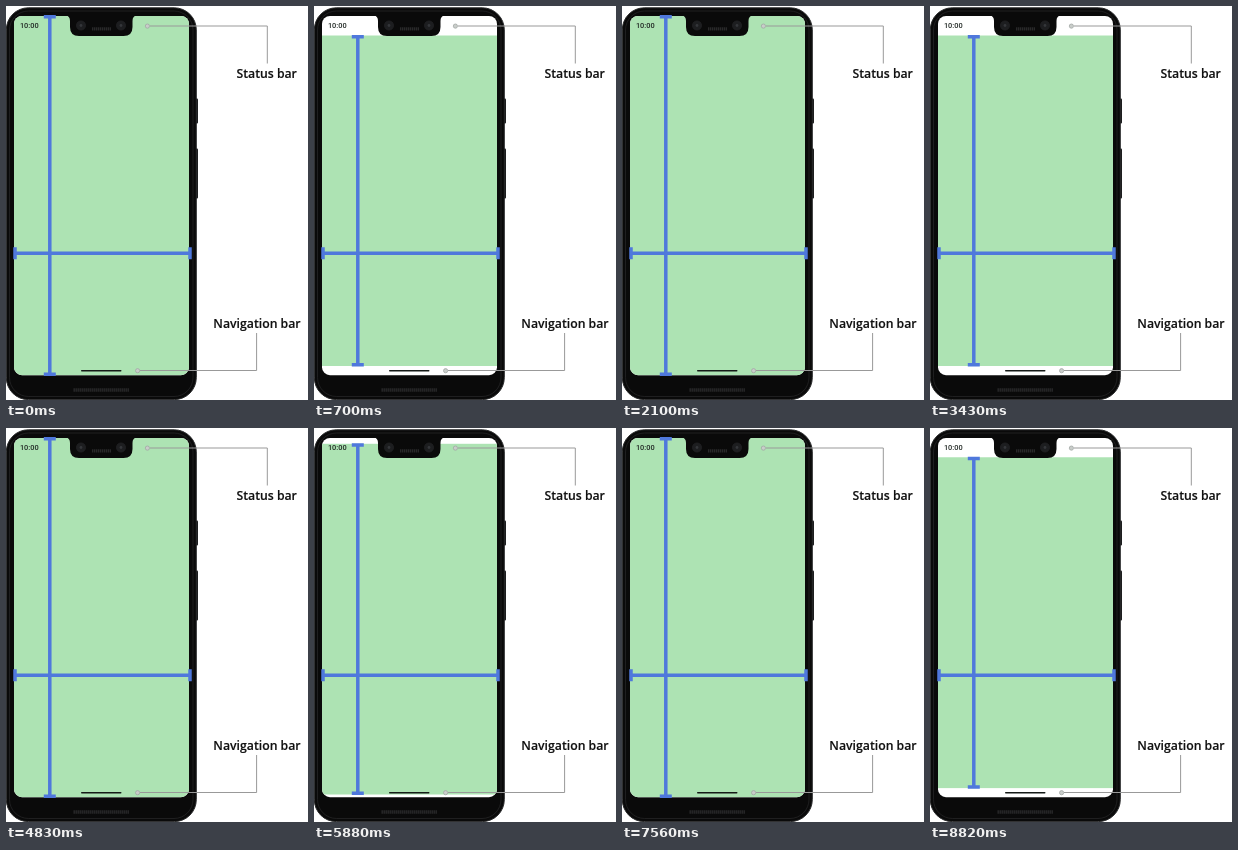
Recreate the animation shown at these times as an HTML page. Size 302 by 394 pixels, loop 8890 ms.

```html
<!DOCTYPE html>
<html lang="en">
<head>
<meta charset="utf-8">
<title>System bars</title>
<style>
  html, body { margin: 0; width: 100%; height: 100%; overflow: hidden; background: #fff; }
  svg { display: block; width: 100%; height: 100%; }
  .label { font: 600 12.25px "Open Sans", sans-serif; fill: #111; stroke: #111; stroke-width: .15; text-anchor: middle; }
  .clock { font: 500 7.4px Roboto, sans-serif; fill: #1f2622; }
  .leader { fill: none; stroke: #999; stroke-width: 1; }
  .dot { fill: #c9cdca; stroke: #a3a8a5; stroke-width: .8; }
  .measure { fill: none; stroke: #4f78dc; stroke-width: 3.5; }
</style>
</head>
<body>
<svg viewBox="0 0 302 394">
  <defs>
    <clipPath id="screen"><rect x="8" y="10" width="175" height="359.2" rx="8"/></clipPath>
  </defs>

  <!-- phone body -->
  <g fill="#1d1e1f">
    <rect x="188" y="92.5" width="4" height="25" rx="1"/>
    <rect x="188" y="142.5" width="4" height="50" rx="1"/>
  </g>
  <rect x="0.3" y="1.8" width="190" height="391.8" rx="22" fill="#0a0a0a" stroke="#2a2b2c"/>
  <rect x="3.5" y="5" width="183.5" height="385.5" rx="19" fill="#0a0a0a" stroke="#29292a" stroke-width=".7"/>
  <path d="M67.5 384H123" stroke="#29292a" stroke-width="3.6" stroke-dasharray="1.4 .6"/>

  <!-- screen -->
  <g clip-path="url(#screen)">
    <rect x="8" y="10" width="176" height="360" fill="#fff"/>
    <rect id="content" x="8" width="176" fill="#ade3b3"/>
  </g>
  <path d="M60 9.5 Q64 10 64 15 V21 Q64 30 73 30 H117.5 Q126.5 30 126.5 21 V15 Q126.5 10 130.5 9.5 Z" fill="#0a0a0a"/>
  <g fill="#1d1e20" stroke="#252628" stroke-width=".6">
    <circle cx="75" cy="19.5" r="4.6"/>
    <circle cx="115" cy="19.5" r="4.6"/>
  </g>
  <g fill="#34363a">
    <circle cx="75" cy="19.5" r="1.4"/>
    <circle cx="115" cy="19.5" r="1.4"/>
  </g>
  <path d="M86 22.8H105" stroke="#29292a" stroke-width="3.2" stroke-dasharray="1.4 .6"/>
  <text class="clock" x="13.9" y="22.2">10:00</text>
  <rect x="75" y="364" width="40.5" height="1.4" rx=".7" fill="#151a17"/>

  <!-- size markers -->
  <path class="measure" d="M9 247.3H184M9 241.3V253.3M184 241.3V253.3"/>
  <path class="measure" id="height"/>

  <!-- callouts -->
  <path class="leader" d="M144 20H261.3V57.5"/>
  <path class="leader" d="M134 364.5H250.6V327"/>
  <circle class="dot" cx="141.4" cy="20.1" r="2.1"/>
  <circle class="dot" cx="131.6" cy="364.7" r="2.1"/>
  <text class="label" x="260.7" y="72.1">Status bar</text>
  <text class="label" x="251" y="321.7">Navigation bar</text>
</svg>
<script>
  const LOOP = 8890, CYCLE = 2730, TICK = 70;
  const content = document.getElementById("content");
  const height = document.getElementById("height");

  const ease = p => p < 0.5 ? 4 * p ** 3 : 1 - (2 - 2 * p) ** 3 / 2;
  const progress = (t, from, to) => ease(Math.min(1, Math.max(0, (t - from) / (to - from))));
  const mix = (a, b, p) => a + (b - a) * p;

  // 0: content fills the screen, 1: content sits between the bars
  function insetAt(ms) {
    const t = ms % CYCLE;
    return progress(t, 210, 700) - progress(t, 1470, 2100);
  }

  function draw(ms) {
    const inset = insetAt(Math.floor((ms % LOOP) / TICK) * TICK);
    const top = mix(9.5, 29.5, inset);
    const bottom = mix(369.5, 360, inset);
    content.setAttribute("y", top);
    content.setAttribute("height", bottom - top);
    const a = top + 1.3, b = bottom - 1.2;
    height.setAttribute("d", `M43.8 ${a}V${b}M37.8 ${a}H49.8M37.8 ${b}H49.8`);
  }

  const start = performance.now();
  function frame() {
    draw(performance.now() - start);
    requestAnimationFrame(frame);
  }
  frame();
</script>
</body>
</html>
```
